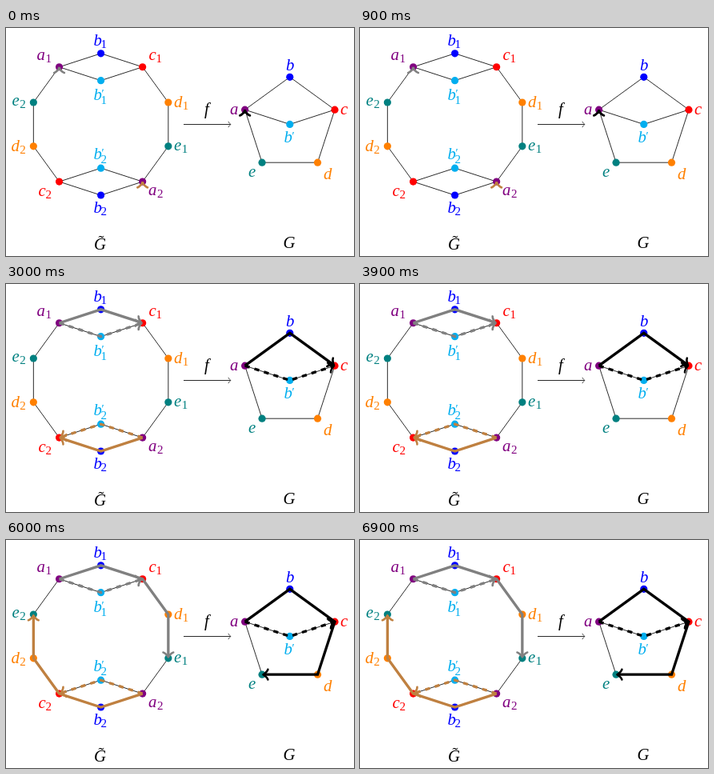
Animation of 435 by 285 pixels, one loop 7.5 s. Source, as an HTML page:

```html
<!DOCTYPE html>
<html lang="en">
<head>
<meta charset="utf-8">
<title>Lifting a walk to a double cover</title>
<style>
  html, body { margin: 0; width: 100%; height: 100%; overflow: hidden; background: #fff; }
  svg { display: block; width: 435px; height: 285px; }
  text { font-family: "Liberation Serif", "Times New Roman", serif; font-size: 20.8px; }
  .math { font-style: italic; }
  .sub { font-size: 15px; }
</style>
</head>
<body>
<svg id="stage" viewBox="0 0 435 285"></svg>
<script>
const PT = 150 / 72;            // pixels per point
const THIN = 0.4 * PT;
const THICK = 1.6 * PT;
const STEP_MS = 1500;
const STEPS = 5;

const COLOURS = {
  a: '#800080', b: '#0000ff', p: '#00aeef',
  c: '#ff0000', d: '#ff8000', e: '#008080'
};
const ADVANCE = { a: 11, b: 9, c: 9, d: 10.8, e: 9.7 };

const stage = document.getElementById('stage');

function add(parent, tag, attrs, content) {
  const node = document.createElementNS('http://www.w3.org/2000/svg', tag);
  for (const key in attrs) node.setAttribute(key, attrs[key]);
  if (content) node.textContent = content;
  return parent.appendChild(node);
}

function polar(cx, radius, degrees) {
  const angle = degrees * Math.PI / 180;
  return [cx + radius * Math.cos(angle), 120.4 - radius * Math.sin(angle)];
}

function line(parent, points, stroke, width, extra) {
  return add(parent, 'polyline', {
    points: points.join(' '), fill: 'none', stroke, 'stroke-width': width, ...extra
  });
}

// Line whose curved arrow tip touches the last point; a lone point faces up.
function arrow(parent, points, stroke, width, extra) {
  const end = points[points.length - 1];
  const before = points[points.length - 2] || [end[0], end[1] + 1];
  const angle = Math.atan2(end[1] - before[1], end[0] - before[0]);
  const unit = 0.28 * PT + 0.3 * width;
  const inset = 0.75 * unit + 0.4 * width;
  const neck = [end[0] - inset * Math.cos(angle), end[1] - inset * Math.sin(angle)];
  const body = points.length > 1 ? points.slice(0, -1) : [end];
  line(parent, [...body, neck], stroke, width, extra);

  const at = (x, y) => `${x * unit},${y * unit}`;
  add(parent, 'path', {
    d: `M${at(-3, 4)} C${at(-2.75, 2.5)} ${at(0, 0.25)} ${at(0.75, 0)}` +
       ` C${at(0, -0.25)} ${at(-2.75, -2.5)} ${at(-3, -4)}`,
    transform: `translate(${neck}) rotate(${angle * 180 / Math.PI})`,
    fill: 'none', stroke, 'stroke-width': 0.8 * width,
    'stroke-linecap': 'round', 'stroke-linejoin': 'round'
  });
}

function label(x, y, key, sub) {
  const prime = key === 'p';
  const letter = prime ? 'b' : key;
  const fill = COLOURS[key];
  const right = x + ADVANCE[letter];
  add(stage, 'text', { x, y, fill, class: 'math' }, letter);
  if (prime) add(stage, 'text', { x: right, y: y - 3, fill, class: 'math sub' }, '′');
  if (sub) add(stage, 'text', { x: right, y: y + (prime ? 5 : 3), fill, class: 'sub' }, sub);
}

// One half of the cover; the other half is its half turn.
function half(turn) {
  const cx = 118.6, r = 1.5 * 59.06;
  const at = degrees => polar(cx, r, degrees + turn);
  const a = at(126), b = at(90), c = at(54);
  const p = [b[0], a[1] + c[1] - b[1]];
  return { a, b, c, d: at(18), e: at(-18), p };
}

function pentagon() {
  const at = degrees => polar(354.8, 59.06, degrees);
  return { a: at(162), b: at(90), c: at(18), d: at(-54), e: at(-126), p: [354.8, 120.4] };
}

const upper = half(0), lower = half(180), base = pentagon();

function edges(g, next) {
  line(stage, [g.a, g.b, g.c, g.d, g.e, next.a], '#000', THIN);
  line(stage, [g.a, g.p, g.c], '#000', THIN);
}

function dots(g) {
  for (const key in g) {
    add(stage, 'circle', { cx: g[key][0], cy: g[key][1], r: 4.6, fill: COLOURS[key] });
  }
}

edges(upper, lower);
edges(lower, upper);
edges(base, base);
[upper, lower, base].forEach(dots);
arrow(stage, [[222, 120.5], [281.5, 120.5]], '#000', THIN);

label(38.5, 40, 'a', '1');
label(109.5, 22, 'b', '1');
label(109.5, 90, 'p', '1');
label(178.5, 40, 'c', '1');
label(210, 99, 'd', '1');
label(210, 153, 'e', '1');
label(178, 209, 'a', '2');
label(109.5, 231, 'b', '2');
label(109.5, 164, 'p', '2');
label(40.5, 210, 'c', '2');
label(6.5, 154, 'd', '2');
label(7.5, 97, 'e', '2');

label(280, 108, 'a');
label(350, 53, 'b');
label(347.5, 143, 'p');
label(418, 108, 'c');
label(397, 189, 'd');
label(303, 186, 'e');

add(stage, 'text', { x: 248, y: 108, class: 'math' }, 'f');
add(stage, 'text', { x: 110, y: 277, class: 'math' }, 'G');
add(stage, 'text', { x: 115.5, y: 274 }, '˜');
add(stage, 'text', { x: 346.5, y: 275, class: 'math' }, 'G');

const walks = add(stage, 'g', {});

function walk(g, colour, step) {
  const route = [g.a, g.b, g.c, g.d, g.e];
  arrow(walks, route.slice(0, step + 1), colour, THICK);
  if (step >= 2) {
    arrow(walks, [g.a, g.p, g.c], colour, THICK, { 'stroke-dasharray': 3 * PT });
  }
}

let shown = -1;

function render(ms) {
  const step = Math.floor(ms / STEP_MS) % STEPS;
  if (step === shown) return;
  shown = step;
  walks.replaceChildren();
  walk(upper, '#808080', step);
  walk(lower, '#bf8040', step);
  walk(base, '#000', step);
}

const start = performance.now();
function tick() {
  render(performance.now() - start);
  requestAnimationFrame(tick);
}
tick();
</script>
</body>
</html>
```
